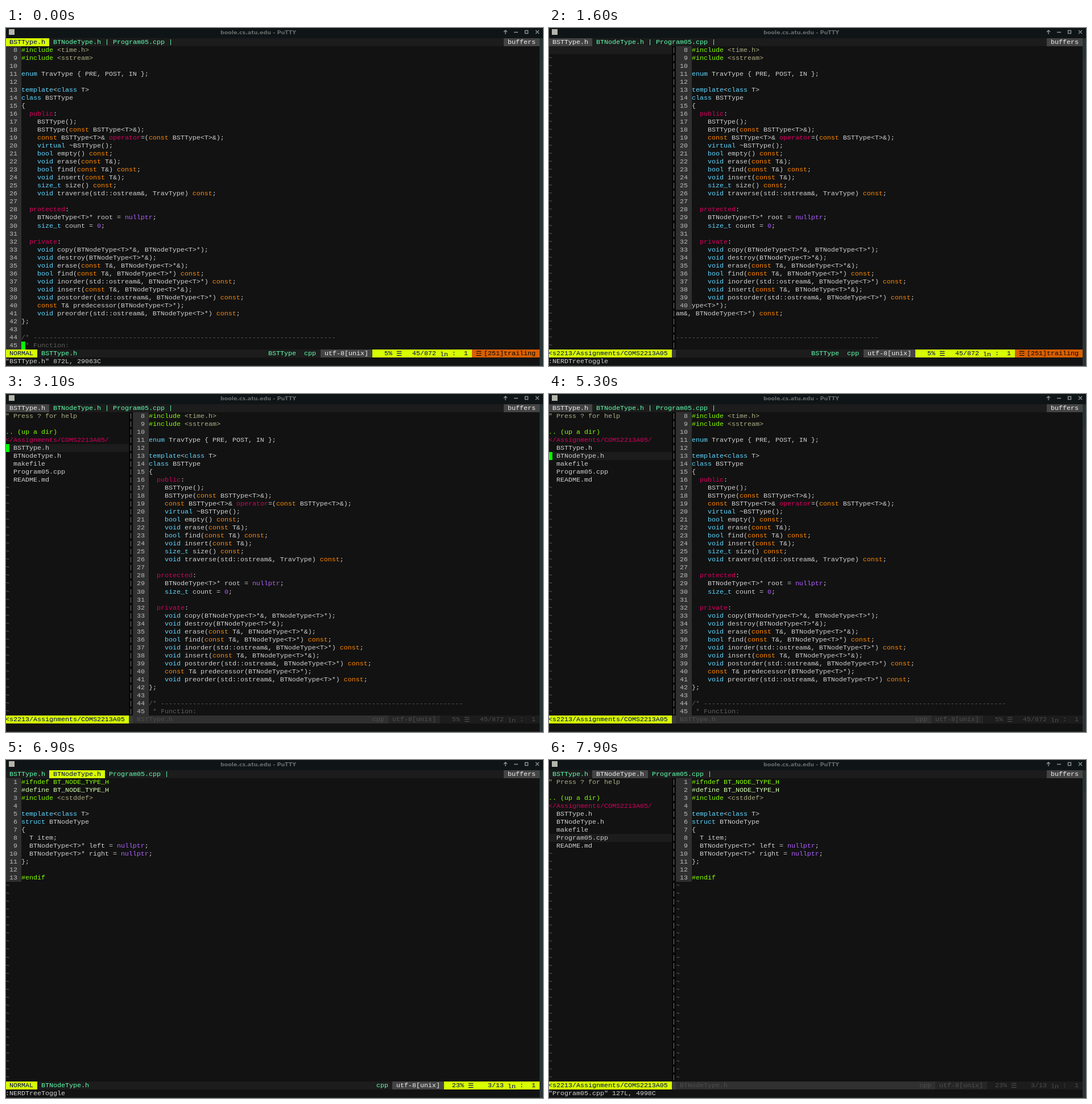
Write an HTML page that moves like this. It is 944 px wide and 594 px high and loops after 8000 ms.

```html
<!DOCTYPE html>
<html lang="en">
<head>
<meta charset="utf-8">
<title>Terminal editor</title>
<style>
  html, body { margin: 0; width: 100%; height: 100%; overflow: hidden; background: #121212; }
  #stage { position: relative; width: 944px; height: 594px; overflow: hidden; background: #121212; }
  .scene { position: absolute; inset: 0; visibility: hidden; }
  .cell {
    position: absolute; white-space: pre; color: #d0d0d0;
    font: 11.678px/14px "Liberation Mono", monospace; font-variant-ligatures: none;
  }
  .sym { font-family: "DejaVu Sans", sans-serif; }
  #bar { position: absolute; left: 0; top: 0; width: 944px; height: 18px; background: #0f1516; }
  #bar b {
    position: absolute; left: 377px; top: 0; white-space: pre; color: #666b6c;
    font: bold 9.46px/15px "DejaVu Sans", sans-serif;
  }
  #bar i { position: absolute; left: 5px; top: 2px; width: 10px; height: 10px; background: #b4b4ac; }
  #bar svg { position: absolute; left: 870px; top: 0; fill: none; stroke: #8b9293; stroke-width: 1.4; }
  #scroll { position: absolute; left: 938px; top: 18px; width: 6px; height: 576px; background: #2a3537; }
  #scroll div { height: 39px; margin-left: 1px; background: #263234; }
  #edge { position: absolute; left: 0; top: 593px; width: 944px; height: 1px; background: #2a3537; }
</style>
</head>
<body>
<div id="stage">
  <div id="bar">
    <i></i><b>boole.cs.atu.edu - PuTTY</b>
    <svg width="74" height="18">
      <path d="M8 11V4M5 7l3-3 3 3M23 7.5h7M42.500 4.500h5v5h-5zM61 4l6 6M67 4l-6 6"/>
    </svg>
  </div>
  <div id="scroll"><div></div></div>
  <div id="edge"></div>
</div>
<script>
// The terminal grid is a 7 by 14 cell enlarged by one pixel over the stage.
const CW = 7 * 944 / 943, RH = 14 * 594 / 593, LEFT = -1, TOP = 32;
const COLS = 134, ROWS = 38, STATUS = ROWS, CMD = ROWS + 1, TABS = -1, TREE_W = 31, SIDE = 32;
const C = {
  bg: '#121212', text: '#d0d0d0', dim: '#5f5f5f', blue: '#5fd7ff', orange: '#ff8700',
  pink: '#d7005f', purple: '#af5fff', green: '#87ff00', tan: '#afaf87', macro: '#d7ffaf',
  lime: '#d7ff00', navy: '#00005f', mint: '#5fffaf', fill: '#1c1c1c', grey: '#444444',
  white: '#eeeeee', gutter: '#303030', num: '#bcbcbc', off: '#4e4e4e', cursor: '#00ff00'
};

const bst = {
  name: 'BSTType.h', first: 8, pct: '5%', line: 45, total: 872, tag: 'BSTType  ',
  warn: '[251]trailing', info: '"BSTType.h" 872L, 29063C', cursorRow: 37,
  code: `#include <time.h>
#include <sstream>

enum TravType { PRE, POST, IN };

template<class T>
class BSTType
{
  public:
    BSTType();
    BSTType(const BSTType<T>&);
    const BSTType<T>& operator=(const BSTType<T>&);
    virtual ~BSTType();
    bool empty() const;
    void erase(const T&);
    bool find(const T&) const;
    void insert(const T&);
    size_t size() const;
    void traverse(std::ostream&, TravType) const;

  protected:
    BTNodeType<T>* root = nullptr;
    size_t count = 0;

  private:
    void copy(BTNodeType<T>*&, BTNodeType<T>*);
    void destroy(BTNodeType<T>*&);
    void erase(const T&, BTNodeType<T>*&);
    bool find(const T&, BTNodeType<T>*) const;
    void inorder(std::ostream&, BTNodeType<T>*) const;
    void insert(const T&, BTNodeType<T>*&);
    void postorder(std::ostream&, BTNodeType<T>*) const;
    const T& predecessor(BTNodeType<T>*);
    void preorder(std::ostream&, BTNodeType<T>*) const;
};

/* ${'-'.repeat(76)}
 * Function:`.split('\n')
};

const node = {
  name: 'BTNodeType.h', first: 1, pct: '23%', line: 3, total: 13, tag: '',
  info: '"BTNodeType.h" 13L, 192C', cursorRow: 2,
  code: `#ifndef BT_NODE_TYPE_H
#define BT_NODE_TYPE_H
#include <cstddef>

template<class T>
struct BTNodeType
{
  T item;
  BTNodeType<T>* left = nullptr;
  BTNodeType<T>* right = nullptr;
};

#endif`.split('\n')
};

const words = {
  blue: 'enum template class struct virtual bool void size_t',
  orange: 'const', pink: 'public protected private operator', purple: 'nullptr 0'
};
const wordColor = {};
for (const k in words) for (const w of words[k].split(' ')) wordColor[w] = C[k];
const wordRe = new RegExp('\\b(' + Object.keys(wordColor).join('|') + ')\\b');

function tokens(s) {
  if (/^( \*|\/\*)/.test(s)) return [[s, C.dim]];
  if (s.startsWith('#define')) return [[s, C.macro]];
  if (s.startsWith('#include')) return [['#include ', C.green], [s.slice(9), C.tan]];
  if (s[0] === '#') return [[s, C.green]];
  return s.split(wordRe).map(w => [w, wordColor[w] || C.text]);
}

const stage = document.getElementById('stage');
const cellX = col => Math.round(LEFT + col * CW);
const cellY = row => Math.round(TOP + row * RH);
let layer;

function box(col, row, w, h, bg) {
  const e = document.createElement('div');
  const x = cellX(col), y = cellY(row);
  e.className = 'cell';
  e.style.cssText = `left:${x}px;top:${y}px;width:${cellX(col + w) - x}px;height:${cellY(row + h) - y}px;background:${bg}`;
  layer.append(e);
  return e;
}

function put(col, row, text, color = C.text, bg = 'transparent') {
  const e = box(col, row, text.length, 1, bg);
  e.textContent = text;
  e.style.color = color;
  return e;
}

function symbol(col, row, text, color) {
  put(col, row, text, color).classList.add('sym');
}

function number(col, row, n) {
  put(col, row, String(n).padStart(3) + ' ', C.num, C.gutter);
}

function pane(col, file, rows = file.code.length) {
  file.code.slice(0, rows).forEach((s, r) => {
    number(col, r, file.first + r);
    const e = put(col + 4, r, s);
    e.textContent = '';
    for (const [t, color] of tokens(s)) {
      const span = document.createElement('span');
      span.textContent = t;
      span.style.color = color;
      e.append(span);
    }
  });
  if (rows === file.code.length) tildes(col, rows);
}

function tildes(col, from) {
  for (let r = from; r < ROWS; r++) put(col, r, '~', C.dim);
}

function tabs(file, active) {
  box(0, TABS, COLS, 1, C.fill);
  const on = active ? [C.navy, C.lime] : [C.white, C.grey];
  let col = 0;
  for (const name of ['BSTType.h', 'BTNodeType.h', 'Program05.cpp']) {
    const current = name === file.name;
    const bar = !current && name !== 'BSTType.h';
    const text = ` ${name} ` + (bar ? '|' : '');
    put(col, TABS, text, ...(current ? on : [C.mint]));
    col += text.length;
  }
  put(125, TABS, ' buffers ', C.white, C.grey);
}

// Percentage, line and column block at the right of a status line.
function position(col, file, color, bg) {
  const head = ' ' + file.pct.padStart(4) + ' ';
  const mid = ' ' + String(file.line).padStart(4) + '/' + file.total + ' ';
  const iconCol = col + head.length, lnCol = iconCol + 1 + mid.length;
  put(col, STATUS, head + ' ' + mid + '   :  1 ', color, bg);
  symbol(iconCol, STATUS, '☰', color);
  put(lnCol, STATUS, 'ln', color).style.marginTop = '1.5px';
}

function positionWidth(file) {
  return 22 + String(file.total).length;
}

function status(file) {
  box(0, STATUS, COLS, 1, C.fill);
  put(0, STATUS, ' NORMAL ', C.navy, C.lime);
  put(9, STATUS, file.name, C.mint);
  let end = COLS;
  if (file.warn) {
    end -= file.warn.length + 4;
    box(end, STATUS, COLS - end, 1, '#d75f00');
    symbol(end + 1, STATUS, '☲', '#080808');
    put(end + 3, STATUS, file.warn, '#080808');
  }
  const pos = end - positionWidth(file);
  position(pos, file, C.navy, C.lime);
  put(pos - 13, STATUS, ' utf-8[unix] ', C.white, C.grey);
  const type = file.tag + 'cpp';
  put(pos - 14 - type.length, STATUS, type, C.mint);
}

function treeStatus() {
  put(0, STATUS, '<s2213/Assignments/COMS2213A05 ', C.navy, C.lime);
  box(TREE_W, STATUS, 1, 1, '#3a3a3a');
}

function idleStatus(file) {
  treeStatus();
  box(SIDE, STATUS, COLS - SIDE, 1, C.gutter);
  put(SIDE + 1, STATUS, file.name, C.off);
  const pos = COLS - positionWidth(file);
  put(pos - 17, STATUS, 'cpp', C.off);
  put(pos - 13, STATUS, ' utf-8[unix] ', C.off, '#262626');
  position(pos, file, C.off, C.fill);
}

function divider() {
  for (let r = 0; r < ROWS; r++) put(TREE_W, r, '|', '#808080', '#080808');
}

function tree(row, cursor) {
  box(0, row, TREE_W, 1, C.fill);
  const lines = [
    ['" Press ? for help', C.tan], [''], ['.. (up a dir)', C.green],
    ['</Assignments/COMS2213A05/', C.pink],
    ['  BSTType.h'], ['  BTNodeType.h'], ['  makefile'], ['  Program05.cpp'], ['  README.md']
  ];
  lines.forEach(([s, color], r) => put(0, r, s, color));
  if (cursor) put(0, row, lines[row][0][0], C.bg, C.cursor);
  tildes(0, lines.length);
  divider();
}

function full(file, cmd, cursor) {
  tabs(file, true);
  pane(0, file);
  if (cursor) put(4, file.cursorRow, file.code[file.cursorRow][0], C.bg, C.cursor);
  status(file);
  put(0, CMD, cmd);
}

function split(file, row, cmd = '') {
  tabs(file, false);
  tree(row, !cmd);
  pane(SIDE, file);
  idleStatus(file);
  put(0, CMD, cmd);
}

// Tree opening: the upper rows are already shifted, the lower ones are not.
function opening() {
  const done = 32;
  full(bst, TOGGLE);
  tabs(bst, false);
  box(0, 0, SIDE, ROWS, C.bg);
  box(SIDE, 0, COLS - SIDE, done, C.bg);
  box(0, 0, TREE_W, 1, C.fill);
  tildes(0, 1);
  divider();
  pane(SIDE, bst, done);
  number(SIDE, done, bst.first + done);
  treeStatus();
}

// Tree closing: the last rows still hold the old split.
function closing() {
  const done = 35;
  split(bst, 5, node.info);
  tabs(node, true);
  box(0, 0, COLS, done, C.bg);
  box(0, done, TREE_W, ROWS - done, C.bg);
  pane(0, node);
}

const TOGGLE = ':NERDTreeToggle', LOOP = 8000;
const steps = [
  [0, () => full(bst, bst.info, true)],
  [1500, () => full(bst, TOGGLE)],
  [1600, opening],
  [1700, () => split(bst, 3)],
  [3100, () => split(bst, 4)],
  [5300, () => split(bst, 5)],
  [5700, () => split(bst, 5, node.info)],
  [5800, closing],
  [5900, () => full(node, node.info, true)],
  [6900, () => full(node, TOGGLE)],
  [7000, () => split(node, 5)],
  [7400, () => split(node, 6)],
  [7500, () => split(node, 7)],
  [7900, () => split(node, 7, '"Program05.cpp" 127L, 4998C')]
];

const scenes = steps.map(([, draw]) => {
  layer = document.createElement('div');
  layer.className = 'scene';
  stage.append(layer);
  draw();
  return layer;
});

let shown = -1;
const start = performance.now();
function tick() {
  const t = (performance.now() - start) % LOOP;
  const now = steps.filter(([at]) => at <= t).length - 1;
  if (now !== shown) {
    if (shown >= 0) scenes[shown].style.visibility = 'hidden';
    scenes[now].style.visibility = 'visible';
    shown = now;
  }
  requestAnimationFrame(tick);
}
tick();
</script>
</body>
</html>
```
